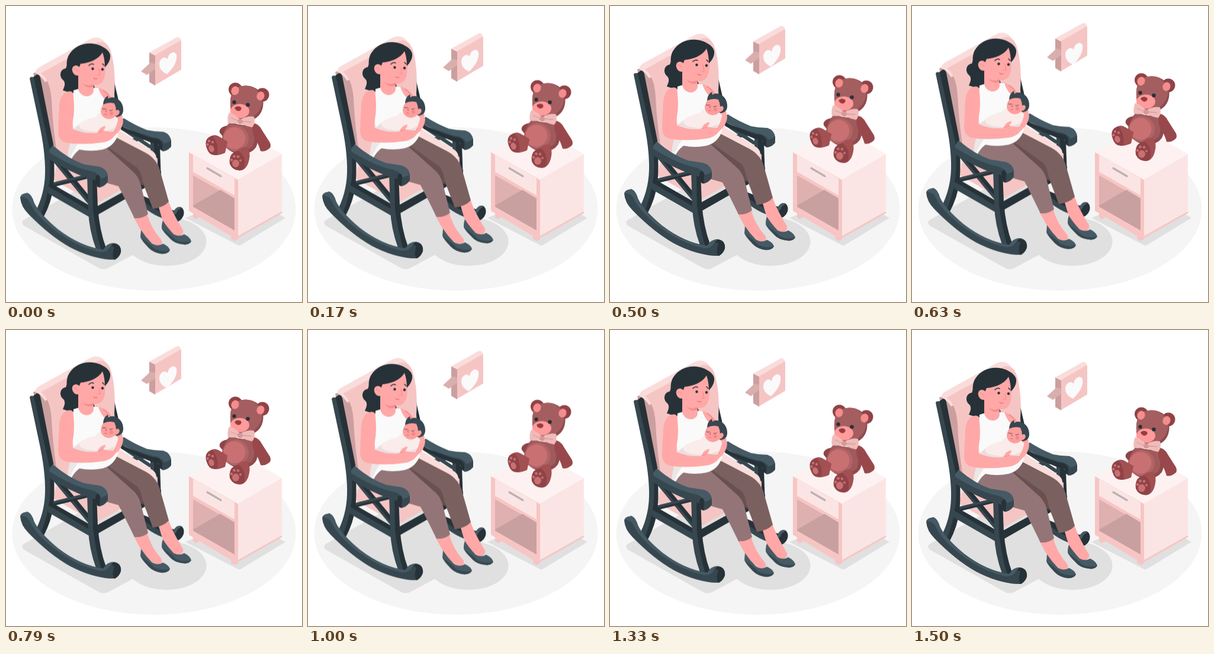
These frames come from a looping animation (500 px wide and 500 px high, 1.54 s). An HTML page:

```html
<!DOCTYPE html>
<html lang="en">
<head>
<meta charset="utf-8">
<title>Rocking chair</title>
<style>
html, body { margin: 0; width: 100%; height: 100%; overflow: hidden; background: #fff; }
svg { display: block; width: 100%; height: 100%; }
.float { animation: float 1540ms linear -40ms infinite; }
.chair { --rise: -10px; }
.bear, .heart { --rise: -19.5px; }
.bubble { --rise: -29px; }
@keyframes float { 50% { transform: translateY(var(--rise)); } }
.ink { fill: #263238; }
.slate { fill: #37474f; }
.steel { fill: #455a64; }
.skin { fill: #ffa8a7; }
.pink { fill: #f5c5c4; }
.pale { fill: #fadcdb; }
.dusk { fill: #cb9f9f; }
.white { fill: #fafafa; }
.shade { fill: #e0e0e0; }
.fur { fill: #a05a5c; }
.furDark { fill: #8f4347; }
.pad { fill: #c97072; }
.line { fill: none; stroke-linecap: round; stroke-linejoin: round; }
</style>
</head>
<body>
<svg viewBox="0 0 500 500">
  <!-- floor and shadows -->
  <ellipse cx="250" cy="343" rx="239.5" ry="138" fill="#f5f5f5"/>
  <path class="shade" d="M29 362L160 288L300 362L215 420L172 443Q163 447 154 441L30 371Q25 366 29 362Z"/>
  <ellipse class="shade" cx="271" cy="398" rx="67.5" ry="41"/>
  <path class="shade" d="M303 358L390 403Q394 406 398 403L472 358L400 318Z"/>

  <!-- bedside table -->
  <g>
    <path class="pink" d="M316 343L328 350V356L321 360L316 357ZM380 380H392V394L386 397L380 393Z"/>
    <path fill="#fdf2f1" d="M309 247L386 204L466 250L389 294Z"/>
    <path fill="#f7c6c4" d="M309 247L389 292L392 294V390L386 392L309 346Z"/>
    <path fill="#fbe5e4" d="M392 293L466 250V347L392 388Z"/>
    <path class="line" d="M391 391L465 349" stroke="#f7c6c4" stroke-width="3"/>
    <path fill="#fbe5e4" d="M316 251L386 291V320L316 280Z"/>
    <path class="line" d="M340 274L363 287.5" stroke="#bcb0b0" stroke-width="3.2"/>
    <path fill="#deb1b0" d="M316 286L386 326V379L316 339Z"/>
    <path fill="#c8a09f" d="M316 337L362 310.500L386 325V379L316 339Z"/>
  </g>

  <g class="float bear">
    <path class="furDark" d="M377 203C366 203 359 209 361 215Q367 224 376 226L386 215Z"/>
    <path fill="#8f4a4d" d="M380 196Q395 205 420 201Q430 224 422 240Q412 254 388 250Q368 243 365 226Q366 208 380 196Z"/>
    <path class="fur" d="M380 196Q395 205 416 201Q423 222 417 238Q406 248 386 246Q367 240 366 226Q368 208 380 196Z"/>
    <ellipse cx="388" cy="225" rx="22" ry="22" fill="#b06466"/>
    <ellipse class="pad" cx="386" cy="224.500" rx="18.500" ry="18.500"/>
    <path fill="#98484b" d="M418 199Q427 200 432 210L446 232Q449 240 443 243Q436 248 430 246Q427 236 424 231Q415 219 416 204Z"/>
    <path class="furDark" d="M341 224Q350 217 359 221L374 230L370 249Q361 253 354 253Q343 254 339 241Q335 230 341 224Z"/>
    <path fill="#a35052" d="M349 220Q355 218 360 222L374 230L370 248L357 253Q360 235 349 220Z"/>
    <path class="furDark" d="M392 245Q398 239 407 240Q414 247 410 263Q406 278 395 279Q383 279 378 268Q376 254 385 248Z"/>
    <path fill="#a35052" d="M392 245Q398 239 407 240Q414 247 410 263Q407 274 402 275Q407 256 392 245Z"/>
    <g class="pad">
      <ellipse cx="347" cy="242" rx="4.5" ry="6" transform="rotate(-22 347 242)"/>
      <circle cx="340.500" cy="235" r="2.200"/><circle cx="343" cy="229" r="2.200"/><circle cx="349" cy="231" r="2.200"/>
      <ellipse cx="388" cy="267" rx="6" ry="6.5"/>
      <circle cx="381" cy="261" r="2.300"/><circle cx="385.500" cy="255" r="2.300"/><circle cx="392" cy="255.500" r="2.300"/><circle cx="396" cy="262" r="2"/>
    </g>
    <circle class="furDark" cx="387.500" cy="142" r="11.500"/>
    <circle class="furDark" cx="433" cy="151" r="11.500"/>
    <path fill="#8f4a4d" d="M386 142Q397 134 411 136C428 139 437 154 434 171C431 188 417 197 402 194Q384 190 380 178Q376 153 386 142Z"/>
    <path fill="#a55e60" d="M386 142Q397 134 409 136C425 139 435 154 432 168C428 184 414 193 400 192Q384 189 380 178Q376 153 386 142Z"/>
    <ellipse cx="387" cy="144" rx="6.5" ry="7.5" fill="#f48d8d" transform="rotate(20 387 144)"/>
    <ellipse cx="430" cy="153" rx="6.5" ry="7.5" fill="#f48d8d" transform="rotate(20 430 153)"/>
    <ellipse cx="395" cy="178.500" rx="16" ry="12" fill="#ff9b9a"/>
    <path fill="#963d42" d="M386 173Q391 168 397 172Q399 175 395 178Q389 180 386 173Z"/>
    <circle class="ink" cx="385.500" cy="163.500" r="3.200"/><circle class="ink" cx="408.500" cy="168" r="3.300"/>
    <path fill="#f0bcba" d="M394 192Q385 182 377 181Q373 190 375 199Q386 200 394 199ZM397 192Q409 186 419 188Q422 198 416 206Q406 204 397 200Z"/>
    <path class="line" d="M380 190L392 195M414 197L400 196" stroke="#d99b9a" stroke-width="1.300"/>
    <ellipse cx="395.500" cy="196" rx="4.500" ry="4.500" fill="#d79897"/>
  </g>

  <g class="float bubble">
    <path class="dusk" d="M242 80L252 85V136L242 130Z"/>
    <path class="pale" d="M242 80L287 55Q290 53 293 55L296 59L252 84Z"/>
    <path class="pink" d="M252 84L294 60Q296 59 296 61V109L252 135Z"/>
    <path fill="#d9afae" d="M228 112L244 97L252 99V108L238 118Z"/>
  </g>
  <path class="float heart white" d="M272 116C263 112 259 106 259 99C259 90 269 84 273 91C274 81 284 75 288 83C290 96 281 107 272 116Z"/>

  <g class="float chair">
    <!-- far side -->
    <path class="ink" d="M174 112L180 116L190 160L196 200L182 200L172 150Z"/>
    <path class="ink" d="M228 320L262 334Q276 344 284 346Q290 338 297 341Q302 346 300 354Q296 365 284 366Q258 359 228 334Z"/>
    <path class="steel" d="M284 346Q290 337 297 341L290 346Q287 354 280 356Z"/>
    <path class="slate" d="M232 330Q258 352 281 352L286 365Q256 360 232 340Z"/>
    <path class="line" d="M195 206L243 238M199 231L247 220" stroke="#37474f" stroke-width="6"/>
    <path class="ink" d="M245 222L260 238L262 296H247Z"/>
    <path class="slate" d="M244 222L250 228V292L244 285Z"/>

    <!-- cushions -->
    <path class="dusk" d="M46 114L64 108Q82 130 86 180L100 262L76 252L58 170Z"/>
    <path class="pale" d="M50 114Q49 108 56 104L141 57Q153 50 164 58L176 74L66 129Q59 118 50 114Z"/>
    <path class="pink" d="M59 114L150 64Q168 55 176 74Q186 104 183 150L190 240L104 270L87 255Q79 205 77 160Q75 126 59 114Z"/>
    <path class="pink" d="M84 268L190 210L256 258V276L152 335L80 294Z"/>
    <path class="pale" d="M84 268L190 210L248 246Q256 252 253 261L152 320L82 282Z"/>
    <path class="pink" d="M84 275L122 255L200 300L254 260Q258 270 255 276L152 334L82 295Z"/>
    <path class="ink" d="M150 341L262 279V292L150 356Z"/>

    <!-- far armrest -->
    <path class="slate" d="M190 200L202 206L248 229Q260 233 263 244Q270 247 278 239L279 229L272 217L240 214Z"/>
    <path class="steel" d="M190 197L199 190Q216 201 238 210Q252 213 266 213Q278 217 279 229L268 233Q261 223 248 222Q220 214 190 201Z"/>
    <path class="ink" d="M194 203Q225 217 248 224Q262 224 264 235V245Q258 243 258 235L244 231Q220 221 195 210Z"/>
    <path class="slate" d="M264 234Q271 233 279 227V238Q272 246 264 246Z"/>

    <!-- legs -->
    <path class="skin" d="M256 334L274 329Q281 350 299 379Q301 388 288 390L270 381Z"/>
    <path class="steel" d="M265 363Q272 374 283 386Q293 391 301 386Q311 391 313 398Q309 405 298 403Q284 401 278 394Q265 382 263 376Q263 367 265 363Z"/>
    <path class="slate" d="M264 377Q279 388 287 396Q299 402 313 398Q309 405 298 403Q284 401 278 394Z"/>
    <path fill="#7b6060" d="M150 235L187 223L235 248Q254 258 260 278L275 331Q266 341 248 343L230 296L178 258Z"/>
    <path fill="#695051" d="M166 248L174 240L222 274Q229 282 232 304L214 296Z"/>
    <path class="skin" d="M215 356L238 350Q244 375 262 395Q267 404 254 406L234 391Z"/>
    <path class="steel" d="M228 379Q236 391 246 401Q256 408 265 402Q275 406 277 413Q273 420 262 419Q249 417 241 409Q229 397 227 391Z"/>
    <path class="slate" d="M228 392Q242 401 250 410Q264 417 277 413Q273 420 262 419Q249 417 241 409Z"/>
    <path fill="#947577" d="M106 262Q114 244 126 234L165 236L212 278Q224 287 228 304L240 352Q231 360 217 359Q201 326 190 305L151 294Z"/>

    <!-- torso -->
    <path class="ink" d="M106 92L101 106C91 107 89 120 97 126Q102 131 96 143Q110 148 125 149L150 138L124 88Z"/>
    <path class="skin" d="M152 138Q168 140 177 153L197 187Q196 204 186 212L170 190Z"/>
    <path class="white" d="M114 143L124 140Q136 146 150 139L156 139Q160 152 169 160L178 212L190 216Q183 238 163 243Q143 247 124 243Q115 250 110 260L104 262Q105 246 118 234L112 196Z"/>
    <path d="M110 228L122 233Q113 245 107 260L104 261Q104 242 110 228Z" fill="#ebe7e7"/>
    <path class="line" d="M164 143Q172 148 176 156" stroke="#f58c8c" stroke-width="1.500"/>
    <path class="skin" d="M122 117L147 128L148 140Q149 150 139 153Q126 154 122 141Z"/>
    <path d="M129 131Q140 138 147 132V137Q136 141 129 131Z" fill="#f58c8c"/>

    <!-- head -->
    <path class="skin" d="M117 92Q144 80 163 78Q170 99 167 118Q164 134 151 134Q131 132 122 117Z"/>
    <path class="ink" d="M113 119C101 115 100 92 107 82C115 69 131 62 146 64C158 65 174 73 176 83C177 92 172 99 167 104Q167 90 163 79C156 91 140 97 126 98Q122 106 122 119Z"/>
    <path class="skin" d="M125 105C119 97 110 102 112 110C114 118 121 120 126 116Z"/>
    <path class="line" d="M115 107Q119 105 121 111" stroke="#f58c8c" stroke-width="1"/>
    <circle class="ink" cx="146.500" cy="106.500" r="2.200"/><circle class="ink" cx="163" cy="107.500" r="2.200"/>
    <path class="line" d="M140 101Q144 97 148 99M163 98L166 101" stroke="#263238" stroke-width="1.500"/>
    <path class="line" d="M157 107L159 117L154 117" stroke="#f58c8c" stroke-width="1.200"/>
    <path class="line" d="M148 122Q151 125 154 123" stroke="#e8686d" stroke-width="1.100"/>

    <!-- baby -->
    <path fill="#faecea" d="M113 209Q129 192 151 188Q158 179 166 180Q187 184 191 195Q193 211 182 215Q149 222 118 215Z"/>
    <path fill="#ecdedd" d="M113 209L124 201Q122 211 150 213Q175 213 189 203Q189 213 180 217Q146 223 116 216Z"/>
    <path class="slate" d="M164 168Q164 157 172 152L173 157Q177 154 182 155C192 157 199 166 198 178Q197 187 187 188L172 178Z"/>
    <path fill="#fb9f9d" d="M164 167Q173 162 183 165Q186 171 186 177Q191 174 192 180Q190 186 185 186Q179 193 170 191Q160 187 160 178Q161 171 164 167Z"/>
    <path class="line" d="M163 174Q166 176 168 174M175 177Q178 178 180 176" stroke="#263238" stroke-width=".8"/>
    <path class="line" d="M170 175L168 178L170 179M167 183.500L170 184" stroke="#d95e64" stroke-width="1.100"/>
    <circle cx="178" cy="182" r="3" fill="#f58687"/>

    <!-- near arm and hands -->
    <path class="skin" d="M100 147Q109 142 113 147Q117 174 113 194L112 208Q132 217 154 215Q159 204 168 203Q168 207 164 211Q172 213 182 213Q187 203 190 190Q196 187 198 194Q198 207 184 219Q177 229 163 231Q126 236 100 231Q88 227 88 213L90 168Q92 152 100 147Z"/>
    <path class="line" d="M164 211Q160 214 156 214M181 214L186 209" stroke="#f58c8c" stroke-width="1"/>

    <!-- near side -->
    <path class="line" d="M82 258L142 331" stroke="#263238" stroke-width="10"/>
    <path class="line" d="M78 258L138 331" stroke="#37474f" stroke-width="4"/>
    <path class="line" d="M74 304L140 288" stroke="#263238" stroke-width="7"/>
    <path class="line" d="M74 302L140 286" stroke="#37474f" stroke-width="4"/>
    <path class="ink" d="M44 122L52 116Q57 116 58 122L80 234Q83 282 80 306Q77 332 63 358L53 352Q72 320 72 282Q72 242 60 194Z"/>
    <path class="slate" d="M40 123Q41 119 47 121L73 238Q77 288 71 313Q66 336 57 357L48 351Q65 320 66 284Q67 247 55 194Z"/>
    <path class="ink" d="M72 302L76 300L149 342V359L72 317Z"/>
    <path class="slate" d="M71 305L146 349V360L71 317Z"/>
    <path class="ink" d="M144 288H153L155 340Q158 380 169 409L160 416L146 358Z"/>
    <path class="slate" d="M137 286H146L147 345Q152 384 161 413L152 411Q140 378 139 346Z"/>

    <path class="ink" d="M36 316Q44 320 47 332Q55 351 88 378Q126 407 164 412Q171 401 182 401Q193 402 194 414Q193 424 184 429L166 428L60 365Z"/>
    <path class="slate" d="M24 324Q25 318 33 317Q41 321 43 334Q53 351 84 379Q122 406 158 414Q168 416 174 407Q179 404 184 409L188 417Q188 428 178 429Q144 427 108 408Q74 389 38 352Q25 339 24 324Z"/>
    <path class="steel" d="M24 323Q26 318 36 316Q44 320 47 332Q57 352 88 378Q126 407 164 412Q171 401 182 401L176 407Q171 417 159 416Q120 408 82 379Q49 353 40 332Q36 323 24 323Z"/>
    <path class="ink" d="M183 408Q187 402 191 405Q195 410 194 417Q191 425 184 429Q179 425 181 416Z"/>

    <path class="slate" d="M73 243L78 241Q114 267 142 273L172 286V297Q167 305 157 307Q151 306 151 295L137 291Q108 281 74 260Z"/>
    <path class="steel" d="M73 243L79 236Q106 259 132 268L158 272Q171 276 172 288L160 293Q156 281 141 279Q111 272 73 248Z"/>
    <path class="ink" d="M151 293Q151 285 157 286L160 293L159 307Q151 306 151 295Z"/>
    <path class="slate" d="M159 292Q166 292 172 287V297Q167 305 158 307Z"/>
  </g>
</svg>
</body>
</html>
```
